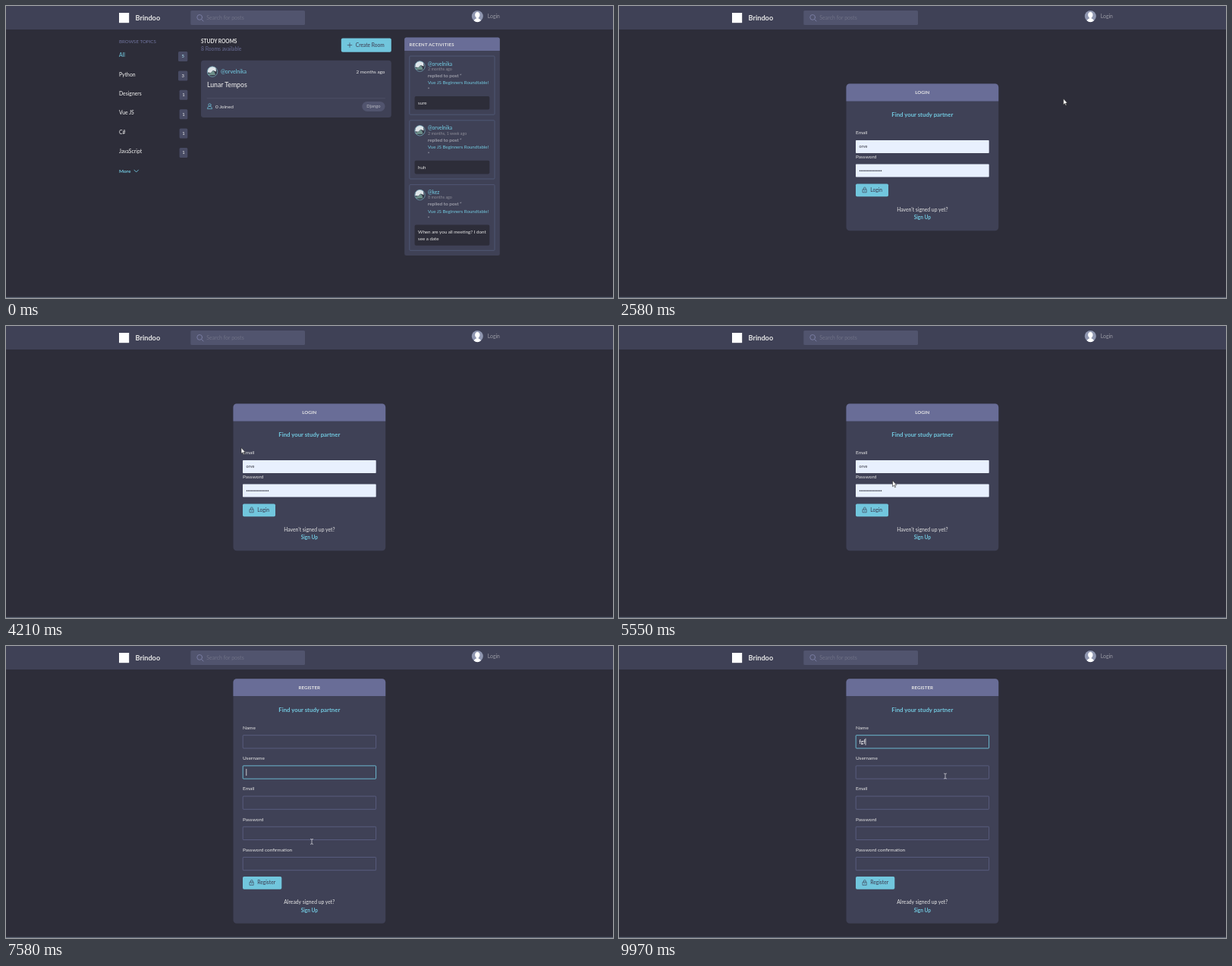
An HTML page that plays this animation: 800 by 385 pixels, repeating every 10000 ms.

```html
<!DOCTYPE html>
<html lang="en">
<head>
<meta charset="utf-8">
<title>Study rooms</title>
<style>
  html, body { margin: 0; width: 100%; height: 100%; overflow: hidden; background: #2d2d39; }
  svg { display: block; width: 800px; height: 385px; }
  text { font-family: Lato, "Open Sans", sans-serif; white-space: pre; }
  .input { fill: none; stroke: #696d97; stroke-width: .6; }
  .input.focus { stroke: #71c6dd; stroke-width: .9; }
</style>
</head>
<body>
<svg id="stage" viewBox="0 0 800 385" xmlns="http://www.w3.org/2000/svg"></svg>
<script>
const LOOP = 10000;
const C = {
  bg: '#2d2d39', dark: '#3f4156', medium: '#51546e', soft: '#696d97',
  main: '#71c6dd', light: '#e5e5e5', gray: '#b8b9c2', dim: '#8b8b96'
};

// Drawing helpers
const rect = (x, y, w, h, fill, r = 0, more = '') =>
  `<rect x="${x}" y="${y}" width="${w}" height="${h}" rx="${r}" fill="${fill}" ${more}/>`;
const text = (x, y, size, str, fill = C.light, more = '') =>
  `<text x="${x}" y="${y}" font-size="${size}" fill="${fill}" ${more}>${str}</text>`;
const line = (d, color, w = .7) =>
  `<path d="${d}" fill="none" stroke="${color}" stroke-width="${w}" stroke-linecap="round" stroke-linejoin="round"/>`;
const group = (id, body) => `<g id="${id}" visibility="hidden">${body}</g>`;
const bold = 'font-weight="700"';
const medium = 'font-weight="500"';
const mid = 'text-anchor="middle"';
const end = 'text-anchor="end"';

// Round frame with a picture that failed to load
const avatar = (x, y) => `<g transform="translate(${x} ${y})">
  <circle r="6.8" fill="#343746"/>
  <path d="M-5.6-3.8A6.8 6.8 0 0 1 4.6-5L5 0 1-1.5-2 1.5-6.5 1Z" fill="#dfe6ea"/>
  <path d="M-6.2 2.6L-2 1.5 1-1.5 3 1 4 4.5-5 4.6Z" fill="#6d8f8a"/>
  <circle r="6.7" fill="none" stroke="#78a9ba" stroke-width=".8"/></g>`;

const lock = (x, y) =>
  line(`M${x - 2.4} ${y - .6}h4.8v4h-4.8zM${x - 1.4} ${y - .6}v-1.4a1.4 1.4 0 0 1 2.8 0v1.4M${x} ${y + 1}v.8`, C.dark, .65);

const header = () =>
  rect(0, 0, 800, 31, C.dark) +
  rect(149, 9, 13.2, 13.2, '#fff') +
  text(170.5, 18.9, 9.2, 'Brindoo', C.light, bold) +
  rect(243.3, 6, 150.7, 19, C.medium, 1.5) +
  line('M258 17.8L260 20M258.6 14.9a3.4 3.4 0 1 1-6.8 0a3.4 3.4 0 1 1 6.8 0', '#7d81a8', .9) +
  text(264.3, 17.9, 7, 'Search for posts', '#6f7186') +
  `<circle cx="621.3" cy="13.5" r="7.5" fill="#8f96b0"/>
   <path d="M616.6 19.3Q618 16.9 619.9 16.6V15.4A3.2 4 0 1 1 622.7 15.4V16.6Q624.6 16.9 626 19.3A7.5 7.5 0 0 1 616.6 19.3Z" fill="#fff"/>` +
  text(634.8, 15.9, 6.8, 'Login', '#9a9ba5');

function topics() {
  const list = [['All', 5], ['Python', 3], ['Designers', 1], ['Vue JS', 1], ['C#', 1], ['JavaScript', 1]];
  return text(149, 48.7, 6.2, 'BROWSE TOPICS', '#7175a0') +
    list.map(([name, count], i) => {
      const y = 25.4 * i, x = i < 2 ? 227 : 228.6, w = 239.3 - x;
      return text(149, 67.2 + y, 6.8, name, i ? C.light : C.main, medium) +
        rect(x, 60 + y, w, 13, '#484b64', 1.5) +
        text(x + w / 2, 68.4 + y, 5.9, count, i ? C.light : '#a9dcea', `${mid} ${medium}`);
    }).join('') +
    text(149, 219.8, 6.4, 'More', C.main, bold) +
    line('M169 216.2L171.7 219 174.4 216.2', C.main, .9);
}

const rooms = () =>
  text(257, 48.8, 6.6, 'STUDY ROOMS', C.light, bold) +
  text(257, 58.9, 6.8, '8 Rooms available', C.soft) +
  rect(441.8, 42.5, 66, 18.2, C.main, 2) +
  line('M450.2 51.6h5.6M453 48.8v5.6', C.dark) +
  text(460.8, 53.8, 6.6, 'Create Room', C.dark, medium) +
  rect(257, 71.8, 250.8, 75.2, C.dark, 3.5) +
  avatar(272, 86.6) +
  text(283, 89, 7, '@orvelnika', C.main, medium) +
  text(499.5, 88.9, 6.4, '2 months ago', C.light, end) +
  text(265, 107.3, 8.7, 'Lunar Tempos', C.light, medium) +
  line('M265 121.7H499.5', C.medium, .6) +
  line('M265.4 135.2q0-3 3.1-3t3.1 3zM270.2 130.4a1.7 1.7 0 1 1-3.4 0a1.7 1.7 0 1 1 3.4 0', C.main, .7) +
  text(276, 134.6, 6.5, '0 Joined') +
  rect(469.3, 125.9, 30.2, 13, C.medium, 6.5) +
  text(484.4, 134.4, 5.8, 'Django', C.gray, mid);

function activities() {
  const items = [
    [66, '@orvelnika', '2 months ago', ['sure']],
    [150.8, '@orvelnika', '2 months, 1 week ago', ['huh']],
    [235.6, '@kez', '8 months ago', ['When are you all meeting? I dont', 'see a date']]
  ];
  return rect(525.2, 41.5, 125.6, 287.5, C.dark, 2.5) +
    `<path d="M525.2 59V44a2.5 2.5 0 0 1 2.5-2.5H648.3a2.5 2.5 0 0 1 2.5 2.5V59Z" fill="${C.soft}"/>` +
    text(531.6, 52.6, 6, 'RECENT ACTIVITIES', C.light, bold + ' letter-spacing=".22"') +
    items.map(([y, who, when, lines]) => {
      const extra = 9.5 * (lines.length - 1);
      return rect(531.8, y, 112.2, 77.2 + extra, 'none', 1, 'stroke="#515a78" stroke-width=".9"') +
        avatar(545.5, y + 13.5) +
        text(556, y + 12.6, 6.6, who, C.main, medium) +
        text(556, y + 18.8, 5.35, when, C.dim) +
        text(556, y + 27.8, 6.4, 'replied to post “', C.gray) +
        text(556, y + 37, 6.15, 'Vue JS Beginners Roundtable!', C.main) +
        text(556, y + 46.4, 6.4, '”', C.gray) +
        rect(538.6, y + 53, 98.7, 17.6 + extra, C.bg, 1.8) +
        lines.map((s, i) => text(543, y + 63.9 + 9.5 * i, 6.2, s)).join('');
    }).join('');
}

// Card with a title bar, a button and a footer link
const card = (top, h, title, btnY, btnW, btn, ask) =>
  rect(299.5, top, 200.7, h, C.dark, 4.5) +
  `<path d="M299.5 ${top + 22.9}V${top + 4.5}a4.5 4.5 0 0 1 4.5-4.5H495.7a4.5 4.5 0 0 1 4.5 4.5V${top + 22.9}Z" fill="${C.soft}"/>` +
  text(399.8, top + 13.5, 6.2, title, C.light, `${mid} ${bold}`) +
  text(399.8, top + 43.6, 7.8, 'Find your study partner', C.main, `${mid} ${bold}`) +
  rect(312, btnY, btnW, 16.7, C.main, 1.8) +
  lock(323.8, btnY + 7.9) +
  text(331.2, btnY + 10.4, 6.7, btn, C.dark, medium) +
  text(399.8, btnY + 36.4, 6.8, ask, C.light, mid) +
  text(399.8, btnY + 46.6, 6.5, 'Sign Up', C.main, `${mid} ${bold}`);

const loginCard = () =>
  card(102.5, 193.7, 'LOGIN', 234.5, 43, 'Login', "Haven't signed up yet?") +
  text(312, 169.3, 6.5, 'Email') +
  rect(312, 177, 175.7, 17, '#e8f0fe', .8) +
  text(316.6, 187.4, 5.5, 'orve', '#30323c') +
  text(312, 201.2, 6.5, 'Password') +
  rect(312, 208.6, 175.7, 17, '#e8f0fe', .8) +
  `<path d="M317.5 217.2h28.2" stroke="#20222c" stroke-width="1.5" stroke-linecap="round" stroke-dasharray="0 2"/>`;

const registerCard = () =>
  card(43.2, 322.5, 'REGISTER', 304, 51.3, 'Register', 'Already signed up yet?') +
  ['Name', 'Username', 'Email', 'Password', 'Password confirmation'].map((label, i) =>
    text(312, 110 + 40.2 * i, 6.5, label) +
    `<rect class="input" x="312.2" y="${117.7 + 40.2 * i}" width="175.4" height="17.2" rx=".8"/>`).join('') +
  text(316.5, 128.5, 6.7, '', '#fff', 'id="typed" ' + medium) +
  rect(0, 0, .8, 9, C.light, 0, 'id="caret"');

const outline = 'stroke-width=".6" stroke-linejoin="round"';
const cursors =
  group('arrow', `<path d="M0 0V7.9L1.8 6.3 3 9 4.2 8.5 3 5.8H5.4Z" fill="#fff" stroke="#222" ${outline}/>`) +
  group('hand', `<path d="M-.9 5V0a.8.8 0 0 1 1.6 0V3L3.9 3.7Q4.7 4 4.5 5L3.8 8.5H.2L-2.2 5.3Q-2-.1-.9 5Z" fill="#fff" stroke="#222" ${outline}/>`) +
  group('beam', line('M-1.5-3.4Q0-3.4 0-2.6Q0-3.4 1.5-3.4M0-2.6V2.6M-1.5 3.4Q0 3.4 0 2.6Q0 3.4 1.5 3.4', '#d4d4da', .75));

document.getElementById('stage').innerHTML =
  rect(0, 0, 800, 385, C.bg) +
  group('header', header()) +
  group('home', topics() + rooms() + activities()) +
  group('login', loginCard()) +
  group('register', registerCard()) +
  rect(0, 383.8, 800, 1.2, '#5c6474') +
  cursors;

// Pointer path: time, x, y
const path = [
  [1030, 481, 136], [1180, 511, 224], [1330, 511, 224], [1480, 530, 262], [1900, 639, 12],
  [2090, 639, 12], [2120, 640, 12], [2360, 640, 12], [2580, 586, 122], [3000, 450, 190],
  [3360, 402, 205], [3600, 340, 247], [3800, 262, 150], [4000, 325, 57], [4210, 310, 160],
  [4390, 400, 230], [4620, 414, 120], [4830, 340, 58], [5050, 260, 150], [5240, 330, 243],
  [5420, 404, 190], [5680, 318, 230], [5880, 396, 284], [6030, 400, 278], [6300, 400, 278],
  [6390, 405, 283], [7030, 404, 290], [7330, 404, 290], [7580, 403, 258], [7800, 486, 245],
  [8020, 440, 313], [8330, 330, 240], [8550, 400, 347], [8800, 486, 260], [9060, 370, 127],
  [9180, 420, 117], [9300, 480, 130], [9450, 480, 130], [9900, 430, 171.5], [LOOP, 430, 171.5]
];

// Smooth interpolation that never overshoots a waypoint
function pointer(t) {
  let i = 0;
  while (i < path.length - 2 && t >= path[i + 1][0]) i++;
  const [a, b] = [path[i], path[i + 1]];
  const span = b[0] - a[0], u = (t - a[0]) / span;
  const slope = (j, k) => j < 0 || j > path.length - 2 ? 0
    : (path[j + 1][k] - path[j][k]) / (path[j + 1][0] - path[j][0]);
  const tangent = (j, k) => {
    const p = slope(j - 1, k), q = slope(j, k);
    return p * q > 0 ? 2 * p * q / (p + q) : 0;
  };
  return [1, 2].map(k => {
    const d = b[k] - a[k];
    const m = tangent(i, k) * span, n = tangent(i + 1, k) * span;
    return a[k] + u * (m + u * (3 * d - 2 * m - n + u * (m + n - 2 * d)));
  });
}

const inside = (x, y, l, t, r, b) => x >= l && x <= r && y >= t && y <= b;

function cursorKind(page, x, y) {
  if (page === 'home') return inside(x, y, 614, 6, 651, 21) ? 'hand' : 'arrow';
  if (page === 'login') {
    if (inside(x, y, 388, 274, 412, 285) || inside(x, y, 312, 234, 355, 251)) return 'hand';
    return inside(x, y, 312, 177, 488, 194) || inside(x, y, 312, 208, 488, 226) ? 'beam' : 'arrow';
  }
  return 'beam';
}

const $ = id => document.getElementById(id);
const show = (id, on) => $(id).setAttribute('visibility', on ? 'inherit' : 'hidden');
const inputs = document.querySelectorAll('.input');
const LOAD = 6480, CLICK = 9060, KEYS = [9600, 9720, 9840];

function render(t) {
  const page = t < 2360 ? 'home' : t < 6300 ? 'login' : t < LOAD ? 'blank' : 'register';
  show('header', page !== 'blank');
  for (const id of ['home', 'login', 'register']) show(id, id === page);

  const field = t < CLICK ? 1 : 0;
  inputs.forEach((el, i) => el.classList.toggle('focus', i === field));
  const typed = KEYS.filter(k => t >= k);
  $('typed').textContent = 'fgf'.slice(0, typed.length);
  const since = typed.length ? typed[typed.length - 1] : t < CLICK ? LOAD : CLICK;
  const blink = Math.floor((t - since) / 530) % 2 === 0;
  const width = typed.length ? $('typed').getComputedTextLength() : 0;
  $('caret').setAttribute('x', 316.4 + width);
  $('caret').setAttribute('y', 121.8 + 40.2 * field);
  show('caret', page === 'register' && blink);

  const [x, y] = pointer(Math.max(t, path[0][0]));
  const kind = t < path[0][0] ? '' : cursorKind(page, x, y);
  for (const id of ['arrow', 'hand', 'beam']) {
    show(id, id === kind);
    $(id).setAttribute('transform', `translate(${x.toFixed(2)} ${y.toFixed(2)})`);
  }
}

const start = performance.now();
function tick() {
  render((performance.now() - start) % LOOP);
  requestAnimationFrame(tick);
}
tick();
</script>
</body>
</html>
```
